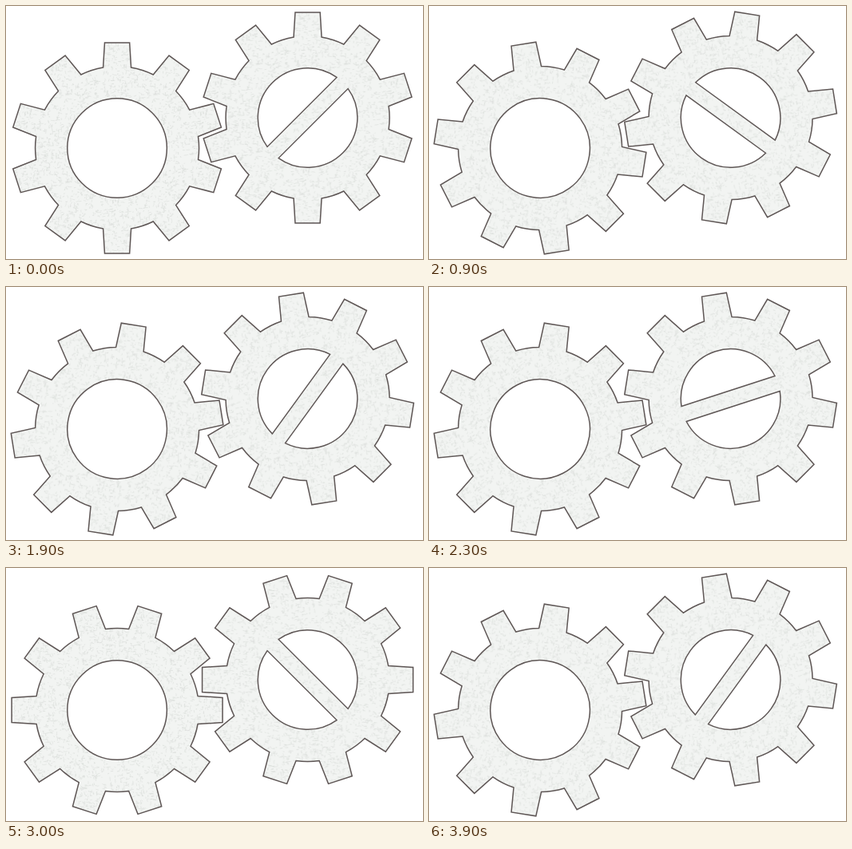
Animation, 522 px wide and 317 px high, one loop 4000 ms. Source, as an HTML page:

```html
<!DOCTYPE html>
<html lang="en">
<head>
<meta charset="utf-8">
<title>Two gears</title>
<style>
  html, body { margin: 0; width: 100%; height: 100%; overflow: hidden; background: #fff; }
  svg { display: block; width: 522px; height: 317px; }
  .gear { fill: url(#paper); fill-rule: evenodd; stroke: #5e5655; stroke-width: 1.5; stroke-linejoin: miter; }
</style>
</head>
<body>
<svg viewBox="0 0 522 317" xmlns="http://www.w3.org/2000/svg">
  <defs>
    <pattern id="paper" width="110" height="110" patternUnits="userSpaceOnUse">
      <rect width="110" height="110" fill="#f2f4f2"/>
      <path id="grain" fill="none" stroke="#dadeda" stroke-width="0.6"/>
    </pattern>
  </defs>
  <path id="left" class="gear"/>
  <path id="right" class="gear"/>
</svg>
<script>
const TEETH = 10, TIP = 132, ROOT = 102.5, HOLE = 62.3;
const TIP_HALF = 15.6, ROOT_HALF = 17.5, BAR_HALF = 10;
const STEP_MS = 100, STEPS = 40, STEP_DEG = 360 / STEPS;
const $ = id => document.getElementById(id);

// Point (x, y) turned clockwise about the gear's centre
function turn(x, y, deg) {
  const a = deg * Math.PI / 180, c = Math.cos(a), s = Math.sin(a);
  return (x * c - y * s).toFixed(2) + ' ' + (x * s + y * c).toFixed(2);
}

function rim() {
  const base = -Math.sqrt(ROOT ** 2 - ROOT_HALF ** 2);
  let d = '';
  for (let i = 0; i < TEETH; i++) {
    const at = (x, y) => turn(x, y, i * 360 / TEETH);
    d += (i ? `A${ROOT} ${ROOT} 0 0 1 ` : 'M') + at(-ROOT_HALF, base) +
      'L' + at(-TIP_HALF, -TIP) + 'L' + at(TIP_HALF, -TIP) + 'L' + at(ROOT_HALF, base);
  }
  return d + `A${ROOT} ${ROOT} 0 0 1 ${turn(-ROOT_HALF, base, 0)}Z`;
}

function roundHole() {
  const arc = `A${HOLE} ${HOLE} 0 0 1 `;
  return `M${-HOLE} 0${arc}${HOLE} 0${arc}${-HOLE} 0Z`;
}

// Two segments leaving a diagonal bar between them
function barredHole() {
  const h = Math.sqrt(HOLE ** 2 - BAR_HALF ** 2);
  return [45, 225].map(deg =>
    `M${turn(BAR_HALF, -h, deg)}A${HOLE} ${HOLE} 0 0 1 ${turn(BAR_HALF, h, deg)}Z`).join('');
}

// Short crooked cracks, mostly along the two axes
function grain() {
  let seed = 17, d = '';
  const rnd = () => (seed = seed * 16807 % 2147483647) / 2147483647;
  const shift = n => ((rnd() - 0.5) * n).toFixed(1);
  for (let i = 0; i < 800; i++) {
    const flat = rnd() < 0.5;
    d += `M${(rnd() * 110).toFixed(1)} ${(rnd() * 110).toFixed(1)}`;
    for (let k = 0; k < 2; k++) d += flat ? `l${shift(7)} ${shift(2)}` : `l${shift(2)} ${shift(7)}`;
  }
  return d;
}

$('grain').setAttribute('d', grain());
$('left').setAttribute('d', rim() + roundHole());
$('right').setAttribute('d', rim() + barredHole());

function place(id, x, y, deg) {
  $(id).setAttribute('transform', `translate(${x} ${y}) rotate(${deg})`);
}

function draw(ms) {
  const deg = Math.floor(ms / STEP_MS) % STEPS * STEP_DEG;
  place('left', 139.1, 178, -deg);
  place('right', 377.6, 140, deg);
}

let start;
function tick(now) {
  start ??= now;
  draw(now - start);
  requestAnimationFrame(tick);
}
draw(0);
requestAnimationFrame(tick);
</script>
</body>
</html>
```
